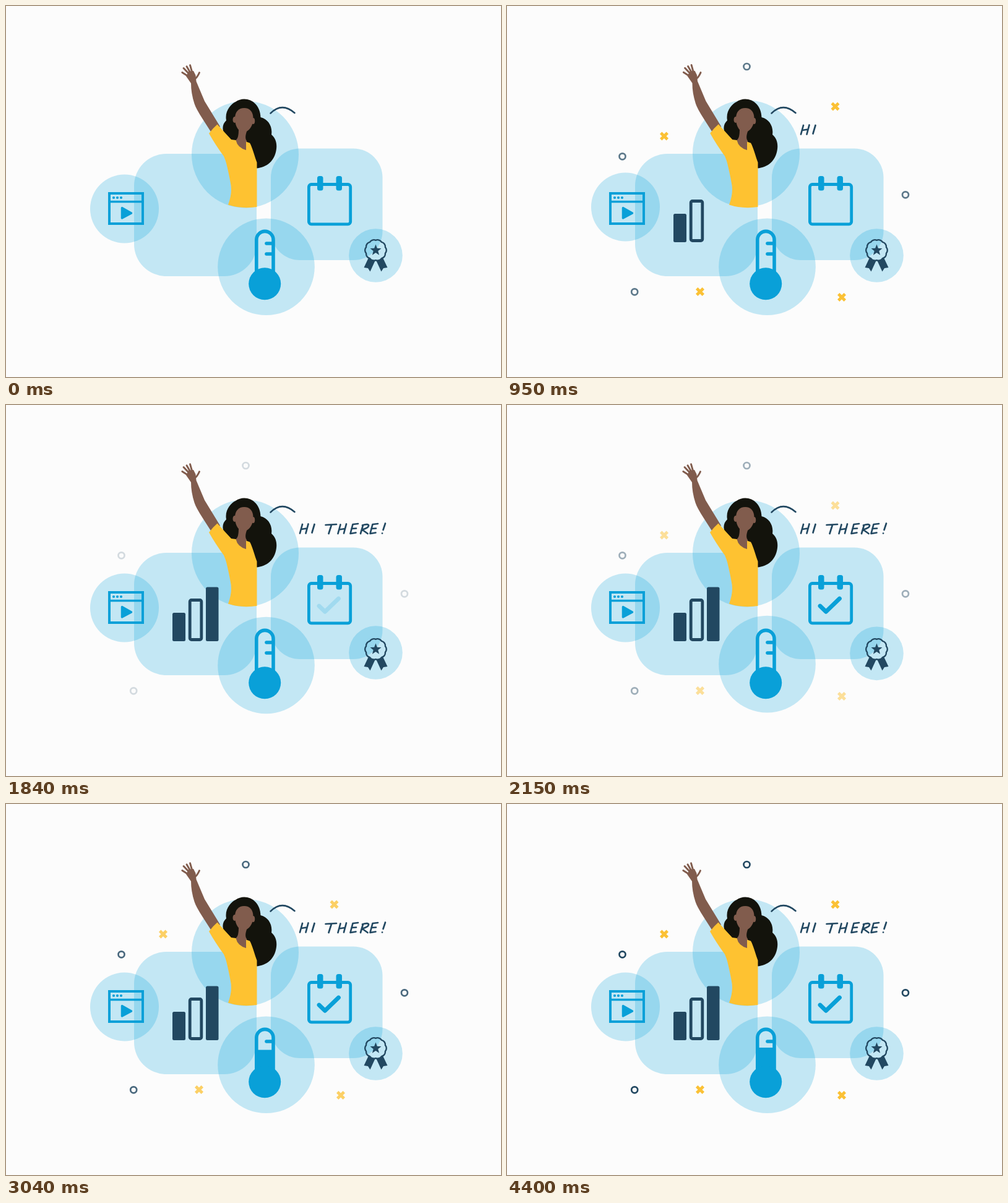
Animation, 800 px wide and 600 px high, one loop 5.07 s. Source, as an HTML page:

```html
<!DOCTYPE html>
<html lang="en">
<head>
<meta charset="utf-8">
<title>Hi there</title>
<style>
  html, body { margin: 0; width: 100%; height: 100%; overflow: hidden; background: #fcfcfc; }
  svg { display: block; width: 800px; height: 600px; }
  .glass { fill: rgba(9, 160, 216, .235); }
  .line { fill: none; stroke: #09a0d8; }
  .solid { fill: #09a0d8; }
  .navy { fill: #224861; }
  .pen { fill: none; stroke: #224861; stroke-width: 2.7; stroke-linecap: round; stroke-linejoin: round; }
  .skin { fill: #815c4d; }
  .shirt { fill: #fec231; }
</style>
</head>
<body>
<svg viewBox="0 0 800 600">
  <g class="glass">
    <rect x="207" y="239" width="198" height="198" rx="52"/>
    <rect x="428" y="230.5" width="180.5" height="180.5" rx="47"/>
    <circle id="videoDisc" cx="191.5" cy="328" r="55.5"/>
    <circle id="personDisc" cx="386.5" cy="240" r="86.5"/>
    <circle id="badgeDisc" cx="597.5" cy="403.5" r="43.3"/>
    <circle id="heatDisc" cx="420.5" cy="421.8" r="78.3"/>
  </g>

  <!-- video window -->
  <g class="line" stroke-width="4">
    <rect x="167" y="303" width="54" height="49"/>
    <path d="M167 316.5H221" stroke-width="3.5"/>
  </g>
  <g class="solid">
    <circle cx="174" cy="310" r="2.1"/>
    <circle cx="180" cy="310" r="2.1"/>
    <circle cx="186" cy="310" r="2.1"/>
    <path d="M187.5 326.5L202.5 335L187.5 343Z" stroke="#09a0d8" stroke-width="3.5" stroke-linejoin="round"/>
  </g>

  <!-- bar chart -->
  <rect class="bar navy" x="269" y="336" width="21" height="46" rx="2.5"/>
  <rect class="bar pen" x="297.2" y="315.5" width="18.6" height="64" rx="2.5" style="stroke-width:4.8"/>
  <rect class="bar navy" x="323" y="294.5" width="20.5" height="87.5" rx="2.5"/>

  <!-- calendar -->
  <rect class="line" x="489.4" y="288.5" width="67.3" height="64.3" rx="4" stroke-width="4.8"/>
  <g class="solid">
    <rect x="503" y="275" width="9.5" height="23.5" rx="3.5"/>
    <rect x="533.5" y="275" width="9.5" height="23.5" rx="3.5"/>
  </g>
  <path id="check" class="line" d="M506 325L515.5 334.3L537.5 313" stroke-width="6.8" stroke-linecap="round" stroke-linejoin="round"/>

  <!-- thermometer -->
  <path class="line" d="M404.8 432V378a13.6 13.6 0 0 1 27.2 0V432M421 384H432M421 401H432" stroke-width="5.6" stroke-linecap="round"/>
  <rect id="level" class="solid" x="403" width="31"/>
  <circle class="solid" cx="418.2" cy="449.3" r="26"/>

  <!-- badge -->
  <path id="seal" class="pen" style="stroke-width:2.4"/>
  <path id="star" class="navy"/>
  <path class="navy" d="M586.5 406L590 410L597 411L588.5 429.5L585 424L578.5 423ZM608.5 406L605 410L598 411L606.5 429.5L610 424L616.5 423Z"/>

  <!-- person -->
  <path fill="#13130c" d="M385 150.5C399 150.5 411 162 411.5 180C424 183 431 195 429 208C436 214 438 222 437 231C435 248 424 261 404 262.5L372 225C362 220 352 212 350.5 199C350 193 352 189 356 185C353 170 364 158 371 155C375 152 380 150.5 385 150.5Z"/>
  <path class="skin" d="M376 198C376 210 375 215 370 218L374 229L390 234L389 218C386 214 387 208 390 200Z"/>
  <g id="arm">
    <path class="skin" d="M334 208L318 183Q307 166 304.500 158Q299 141 299 125L291 113.500L295 106L303 105L306.500 112L307.500 122L321 154L346 195Z"/>
    <path d="M284.800 107.500L295 114M287 100.500L296 110M292 97.800L298 108M297.500 95.700L301 108M312.500 107.800Q309 116 304 119" fill="none" stroke="#815c4d" stroke-width="2.900" stroke-linecap="round"/>
    <path class="shirt" d="M341.500 191.500L364 216L382 240L366 275L355.500 252L352 243Q338 224 328 206Q334 198 341.500 191.500Z"/>
  </g>
  <path class="shirt" d="M364 216L371.500 217Q374 229 388 233L388 219.500L394 221.500C398 228 402 244 405.500 253L405.500 325Q380 328.500 359 321.500C364 308 365 297 363 287C361 275 358 262 355.500 252L360 232Z"/>
  <g class="skin">
    <path d="M385 165C394 165 399.500 171 399.500 182C399.500 194 392 204 384 204C376 204 370 194 370 182C370 171 376 165 385 165Z"/>
    <ellipse cx="369.500" cy="184" rx="3" ry="5"/>
    <ellipse cx="399.500" cy="186" rx="2.700" ry="5"/>
  </g>

  <!-- greeting -->
  <path class="pen" style="stroke-width:2.500" d="M427.500 173.500Q446 155 466.500 173"/>
  <g id="greeting" class="pen" role="img" aria-label="HI THERE!"></g>

  <g id="rings" class="pen"></g>
  <g id="crosses" fill="none" stroke="#fbc135" stroke-width="4.800"></g>
</svg>
<script>
const LOOP = 5070;
const $ = id => document.getElementById(id);
const clamp = v => Math.max(0, Math.min(1, v));
const progress = (t, from, to) => clamp((t - from) / (to - from));
const smooth = p => p * p * (3 - 2 * p);
const path = d => `<path d="${d}"/>`;
const polar = (r, turn) => {
  const a = (turn - .25) * 2 * Math.PI;
  return `${597.5 + r * Math.cos(a)} ${395 + r * Math.sin(a)}`;
};

// Linear interpolation through [time, value] points.
function track(t, points) {
  let [t0, v0] = points[0];
  for (const [t1, v1] of points) {
    if (t < t1) return v0 + (v1 - v0) * progress(t, t0, t1);
    [t0, v0] = [t1, v1];
  }
  return v0;
}

let seal = 'M' + polar(16.2, 0);
for (let i = 1; i <= 10; i++) seal += `A7.5 7.5 0 0 1 ${polar(16.2, i / 10)}`;
$('seal').setAttribute('d', seal + 'Z');
$('star').setAttribute('d', 'M' + Array.from({ length: 10 }, (_, i) => polar(i % 2 ? 4 : 9.5, i / 10)).join('L') + 'Z');

// Hand-lettered strokes, one entry per typed character.
const letterE = 'm14 -.5l-8.500 1l-4 15l9 -1.500m-7 -6.500l7.500 -.5';
const letters = [
  'M479 193L475 207.500M488.500 192.500L484.500 207.500M477 201L486.500 199.500',
  'M498.500 193L494.500 206.500',
  '',
  'M516.500 194L534 193M526 194L521.500 208',
  'M540.500 193.500L536.500 208M550 192.500L546 207.500M538.500 201.500L548 200',
  'M555 192.500' + letterE,
  'M577 194.500L573 208M576 194.500C590 189.500 589 199 575.500 201.500L584.500 208',
  'M587 192.500' + letterE,
  'M613 191.500L609.500 202M608 207.500h.1'
];
$('greeting').innerHTML = letters.map(path).join('');
$('rings').innerHTML = [[387.5, 98], [186.5, 243.3], [644, 305.3], [206.2, 462.3]]
  .map(([x, y]) => `<circle cx="${x}" cy="${y}" r="5"/>`).join('');
$('crosses').innerHTML = [[254, 210.5], [530.5, 162.5], [312, 462], [541, 471]]
  .map(([x, y]) => path(`M${x - 5.3} ${y - 5.3}l10.6 10.6m0 -10.6l-10.6 10.6`)).join('');

const bars = document.querySelectorAll('.bar');
const glyphs = $('greeting').children;
const discs = [['videoDisc', 220, 1650], ['personDisc', 600, 2000], ['badgeDisc', 1180, 2500], ['heatDisc', 1600, 2980]];
const ringFade = [[300, 0], [1100, .9], [1250, .9], [1950, .05], [2450, 1], [2900, 1], [3650, .06], [4400, 1]];
const crossFade = [[220, 0], [800, 1], [1100, 1], [1700, 0], [1900, 0], [2400, 1], [2900, 1], [3500, 0], [3720, 0], [4380, 1]];

function draw(t) {
  for (const [id, from, to] of discs) {
    const lift = -3 * Math.sin(Math.PI * progress(t, from, to)) ** 2;
    $(id).setAttribute('transform', `translate(0 ${lift})`);
  }
  const wave = 3 * Math.sin(2 * Math.PI * progress(t, 220, 1800)) ** 2;
  $('arm').setAttribute('transform', `rotate(${wave} 387 290)`);

  bars.forEach((bar, i) => bar.style.opacity = progress(t, 330 + i * 330, 560 + i * 330));
  for (let i = 0; i < glyphs.length; i++) {
    glyphs[i].style.visibility = t >= 810 + i * 110 ? 'visible' : 'hidden';
  }
  $('check').style.opacity = progress(t, 1780, 2120);

  const top = 428 - 34 * smooth(progress(t, 2100, 3280));
  $('level').setAttribute('y', top);
  $('level').setAttribute('height', 440 - top);

  $('rings').style.opacity = track(t, ringFade);
  $('crosses').style.opacity = track(t, crossFade);
}

const start = performance.now();
function tick() {
  draw((performance.now() - start) % LOOP);
  requestAnimationFrame(tick);
}
tick();
</script>
</body>
</html>
```
